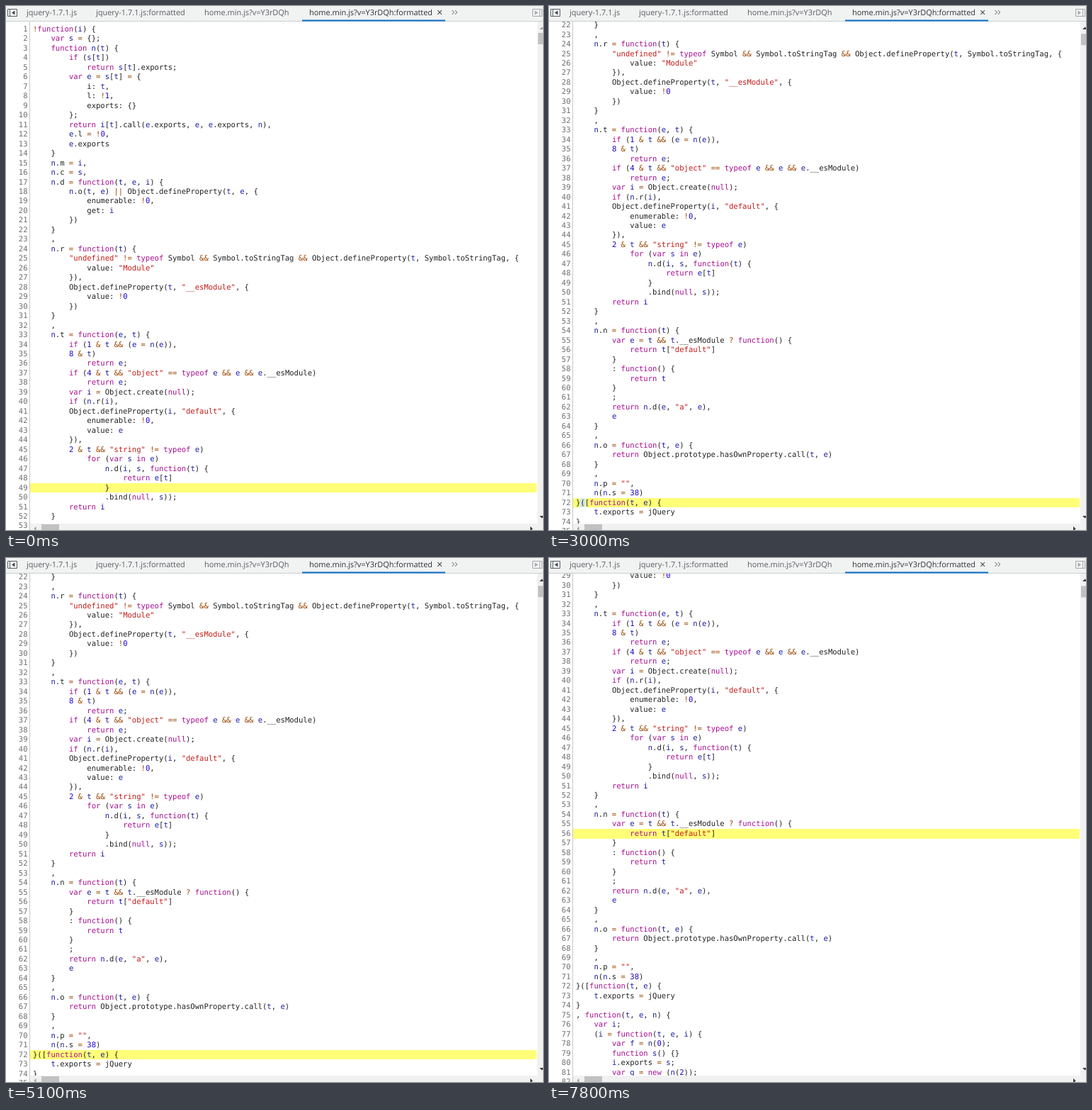
Animation of 758 by 739 pixels, one loop 8000 ms. Source, as an HTML page:

```html
<!DOCTYPE html>
<html lang="en">
<head>
<meta charset="utf-8">
<title>Code viewer</title>
<style>
html, body { margin: 0; width: 100%; height: 100%; overflow: hidden; background: #fff; }
#stage { position: relative; width: 758px; height: 739px; overflow: hidden; background: #fff; }
#stage div, #stage span.tab, svg { position: absolute; }
#view { left: 0; top: 22px; width: 750px; height: 717px; overflow: hidden; }
#sheet { left: 0; top: 0; width: 750px; }
#text { left: 0; top: 0.75px; width: 750px; }
#gutter { left: 33px; top: 22px; width: 1px; height: 717px; background: #c8c8c8; }
.line, .num {
  font: 10.55px/13.47px "DejaVu Sans Mono", monospace;
  height: 13.47px; white-space: pre; color: #212121;
  text-rendering: geometricPrecision;
}
.line { left: 38px; }
.num { left: 0; width: 30.5px; text-align: right; color: #6e6e6e; }
.k { color: #aa0d91; }
.n { color: #1c00cf; }
.s { color: #c41a16; }
.o { color: #994500; }
.v { color: #1a1aa6; }
#mark { background: #ffff78; }
.sel { background: #cfe8fc; }
#bar { left: 0; top: 0; width: 758px; height: 22px; background: #f1f3f3; border-bottom: 1px solid #cbcdd1; box-sizing: border-box; }
.tab {
  top: 1px; font: 10.95px/17px "Open Sans", sans-serif; color: #5a5d61;
  white-space: pre; text-rendering: geometricPrecision;
}
.tab.on { color: #303236; }
svg { left: 0; top: 0; }
</style>
</head>
<body>
<div id="stage">
  <div id="view"><div id="sheet"><div id="mark"></div><div id="sels"></div><div id="text"></div></div></div>
  <div id="gutter"></div>
  <div id="bar"></div>
  <svg width="758" height="739" viewBox="0 0 758 739">
    <rect x="418" y="19.5" width="202" height="2" fill="#0b6fc8"/>
    <g fill="none" stroke="#5a5d61">
      <path d="M2.5 4.5H15.5V14.5H2.5ZM5.5 4.5V14.5"/>
      <path d="M609.3 6.2L615 11.9M615 6.2L609.3 11.9" stroke="#45484c" stroke-width="1.1"/>
      <path d="M629.5 6L632.5 9L629.5 12M633.8 6L636.8 9L633.8 12"/>
      <path d="M743.5 4.5H756.5V14.5H743.5ZM753.5 4.5V14.5" stroke="#a6a8aa"/>
    </g>
    <path d="M12.5 6.5V12.5L8 9.5Z" fill="#45484c"/>
    <path d="M746.5 6.5V12.5L751 9.5Z" fill="#a6a8aa"/>
    <path d="M34 730H750V22H758V739H34Z" fill="#f1f1f1"/>
    <rect x="50" y="731" width="25" height="8" fill="#c1c1c1"/>
    <rect id="thumb" x="751" width="7" height="16" fill="#c1c1c1"/>
    <path id="up" d="M753 33H758V31L756.5 29.5Z"/>
    <path d="M753 719H758V721L756.5 722.5Z" fill="#404040"/>
    <path d="M42.5 734V739H41L39.5 737Z" fill="#a3a3a3"/>
    <path d="M740 734V739H742L743.5 737Z" fill="#404040"/>
  </svg>
</div>
<pre id="code" hidden>
!function(i) {
    var s = {};
    function n(t) {
        if (s[t])
            return s[t].exports;
        var e = s[t] = {
            i: t,
            l: !1,
            exports: {}
        };
        return i[t].call(e.exports, e, e.exports, n),
        e.l = !0,
        e.exports
    }
    n.m = i,
    n.c = s,
    n.d = function(t, e, i) {
        n.o(t, e) || Object.defineProperty(t, e, {
            enumerable: !0,
            get: i
        })
    }
    ,
    n.r = function(t) {
        "undefined" != typeof Symbol &amp;&amp; Symbol.toStringTag &amp;&amp; Object.defineProperty(t, Symbol.toStringTag, {
            value: "Module"
        }),
        Object.defineProperty(t, "__esModule", {
            value: !0
        })
    }
    ,
    n.t = function(e, t) {
        if (1 &amp; t &amp;&amp; (e = n(e)),
        8 &amp; t)
            return e;
        if (4 &amp; t &amp;&amp; "object" == typeof e &amp;&amp; e &amp;&amp; e.__esModule)
            return e;
        var i = Object.create(null);
        if (n.r(i),
        Object.defineProperty(i, "default", {
            enumerable: !0,
            value: e
        }),
        2 &amp; t &amp;&amp; "string" != typeof e)
            for (var s in e)
                n.d(i, s, function(t) {
                    return e[t]
                }
                .bind(null, s));
        return i
    }
    ,
    n.n = function(t) {
        var e = t &amp;&amp; t.__esModule ? function() {
            return t["default"]
        }
        : function() {
            return t
        }
        ;
        return n.d(e, "a", e),
        e
    }
    ,
    n.o = function(t, e) {
        return Object.prototype.hasOwnProperty.call(t, e)
    }
    ,
    n.p = "",
    n(n.s = 38)
}([function(t, e) {
    t.exports = jQuery
}
, function(t, e, n) {
    var i;
    (i = function(t, e, i) {
        var f = n(0);
        function s() {}
        i.exports = s;
        var g = new (n(2));
        </pre>
<script>
const $ = id => document.getElementById(id);
const ROW = 13.47, TOP = 4.27, CH = 6.351, LEFT = 38, RIGHT = 749, LOOP = 8000;
const rowY = n => TOP + (n - 1) * ROW;

function add(parent, tag, cls, text, css) {
  const el = document.createElement(tag);
  el.className = cls;
  el.textContent = text;
  Object.assign(el.style, css);
  return parent.appendChild(el);
}

[[29, 'jquery-1.7.1.js'], [127, 'jquery-1.7.1.js:formatted'],
 [280, 'home.min.js?v=Y3rDQh'], [428, 'home.min.js?v=Y3rDQh:formatted']]
  .forEach(([x, name], i) => add($('bar'), 'span', i === 3 ? 'tab on' : 'tab', name, { left: x + 'px' }));

// Syntax colouring: strings, properties, keywords, numbers, locals, operators
const TOKEN = /("[^"]*")|(\.\w+|\w+(?=: ))|\b(function|var|if|return|typeof|for|in|new|null)\b|\b(\d+)\b|\b([a-z])\b|([!=&|?]+)|\w+|[^\w"]/g;
const CLASSES = ['s', '', 'k', 'n', 'v', 'o'];

function paint(line, src) {
  for (const m of src.matchAll(TOKEN)) {
    const cls = CLASSES[m.slice(1).findIndex(g => g !== undefined)];
    if (cls) add(line, 'span', cls, m[0]);
    else line.append(m[0]);
  }
}

const nums = $('code').textContent.replace(/^\n/, '').split('\n').map((src, i) => {
  const top = rowY(i + 1) + 'px';
  paint(add($('text'), 'div', 'line', '', { top }), src);
  return add($('text'), 'div', 'num', i + 1, { top });
});

// [time, value] steps; each value holds until the next one
const scrolls = [[0, 0], [600, 48], [700, 144], [800, 241], [900, 288.75], [5800, 0],
  [6700, 48], [6800, 144], [6900, 192.5], [7600, 241], [7700, 337], [7800, 385]];
const marks = [[0, 49], [300, 15], [3000, 72], [5800, 56]];
// Selection as [row, column] start and end
const anchor = [72, 1];
const picks = [[0, null], [3000, [anchor, [72, 2]]],
  ...[[70, 4], [66, 4], [61, 3], [56, 3], [53, 3], [54, 3]]
    .map((from, i) => [3200 + i * 100, [from, anchor]]),
  [5100, null]];

const at = (steps, t) => steps.reduce((v, [time, next]) => t >= time ? next : v, null);

const parts = [0, 1, 2].map(() => add($('sels'), 'div', 'sel', ''));
function box(el, x1, x2, r1, r2) {
  Object.assign(el.style, {
    left: x1 + 'px', width: Math.max(0, x2 - x1) + 'px',
    top: rowY(r1) + 'px', height: Math.max(0, r2 - r1) * ROW + 'px'
  });
}

function select(range) {
  $('sels').style.display = range ? '' : 'none';
  if (!range) return;
  const [[r1, c1], [r2, c2]] = range;
  const x1 = LEFT + c1 * CH, x2 = LEFT + c2 * CH, one = r1 === r2;
  box(parts[0], x1, one ? x2 : RIGHT, r1, r1 + 1);
  box(parts[1], LEFT, RIGHT, r1 + 1, r2);
  box(parts[2], LEFT, one ? LEFT : x2, r2, r2 + 1);
}

function draw(t) {
  const y = at(scrolls, t), row = at(marks, t);
  $('sheet').style.top = -y + 'px';
  box($('mark'), 34, RIGHT, row, row + 1);
  select(at(picks, t));
  // The gutter number below the last full row appears late
  nums[74].style.visibility = t >= 900 && t < 3000 ? 'hidden' : '';
  $('thumb').setAttribute('y', 38 + y * 0.004);
  $('up').setAttribute('fill', y ? '#404040' : '#a3a3a3');
}

const start = performance.now();
function tick() {
  draw((performance.now() - start) % LOOP);
  requestAnimationFrame(tick);
}
tick();
</script>
</body>
</html>
```
